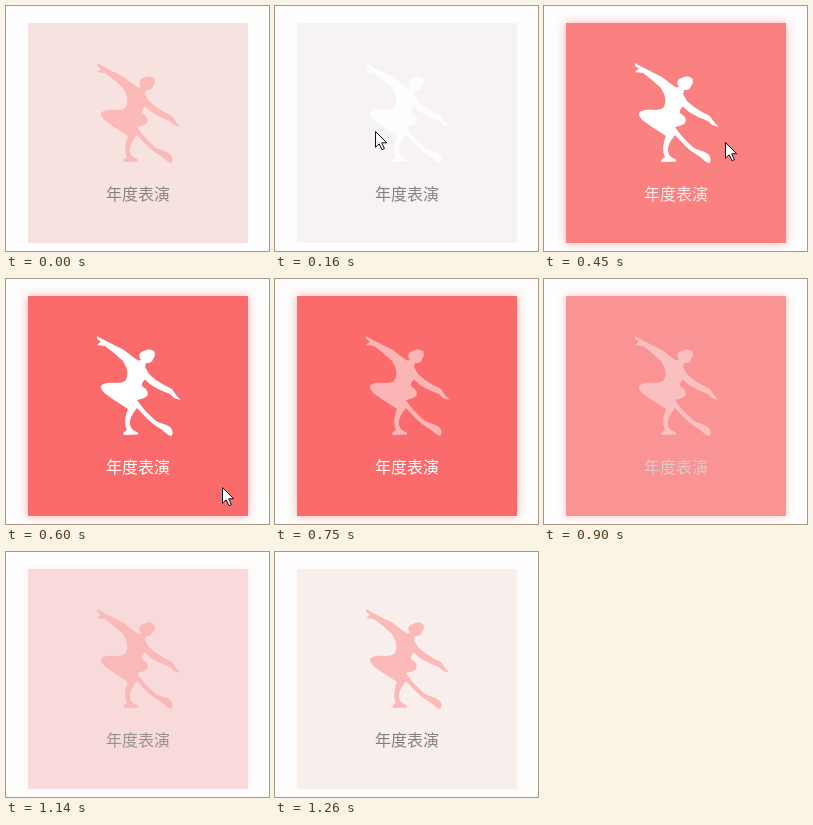
An HTML page for the animation above (1360 ms loop, 263 by 245 pixels).

```html
<!DOCTYPE html>
<html lang="zh-CN">
<head>
<meta charset="utf-8">
<style>
  html, body { margin: 0; width: 100%; height: 100%; overflow: hidden; background: #fefefe; }
  #card { position: absolute; left: 22px; top: 17px; width: 220px; height: 220px; }
  #label {
    position: absolute; left: 0; top: 158px; width: 220px;
    font: 300 16px/24px "Noto Sans CJK SC", "Noto Sans CJK", sans-serif; text-align: center;
  }
  svg { position: absolute; left: 0; top: 0; }
</style>
</head>
<body>
<div id="card"><div id="label">年度表演</div></div>
<svg width="263" height="245">
  <path id="dancer" d="M91 57L97 60.500 108 66 118 71 127 78 132 81.500 135 81
    C132 77 133 73 138 72C141 69.500 147 70 148.500 73C149.500 77 148 79 147 80
    C146 84 143 84 140 84L139 88 143 95 150 101 158 106 166 110 170 116 174.500 121
    168 119 164 115 154 111 145 106 139 100.500C136 103 135 106 137 108
    C141 110 143 114 141 117C138 120 134 120 131 121
    C136 129 143 136 150 142C156 145 161 145 165 149C167 152 167 156 165 157
    C161 156 159 153 155 150C147 146 139 138 131 129
    C127 134 123 140 124 146C125 150 128 152 132 153.500L132 155.500 118 156 117 154 121 151
    C118 145 119 137 122 130C115 125 107 121 101 116
    C94 111 93 106 98 105C106 102 113 106 119 102
    C122 98 122 93 120 88L117 82 108 74 99 67 91 66 95 62.500 91 60Z"/>
  <path id="cursor" d="M.5.5V16.300L4.200 12.800 7 18.700 9.400 17.600 6.700 11.800H11.800Z"
    fill="#fff" stroke="#112"/>
</svg>
<script>
const LOOP = 1360;
const $ = id => document.getElementById(id);
const card = $('card'), label = $('label'), dancer = $('dancer'), cursor = $('cursor');

// start, card, dancer, text, glow radius, glow opacity, cursor tip
const states = [
  [0, '#f8e2e0', '#fbb9b8', '#8a8484', 0, 0],
  [160, '#f6f3f2', '#fdfdfd', '#858080', 0, 0, [100, 125]],
  [300, '#f8b4b5', '#fff', '#b5a9aa', 5, .3, [177, 128]],
  [450, '#fb8181', '#fff', '#fbeaea', 9, .5, [181, 136]],
  [600, '#fc6b6b', '#fff', '#fff', 9, .5, [216, 208]],
  [750, '#fc6b6b', '#fcb5b5', '#fff', 9, .5],
  [900, '#fa9494', '#fac0c0', '#dccaca', 7, .4],
  [1020, '#f7c1c1', '#f8bcbc', '#aaa2a4', 5, .15],
  [1140, '#f8dada', '#fab9b9', '#989092', 8, .04],
  [1260, '#f8eeec', '#fbb9b8', '#858080', 8, .02]
];

function draw(now) {
  const t = now % LOOP;
  const [, fill, figure, text, blur, alpha, tip] = states.findLast(s => s[0] <= t);
  const glow = a => `rgba(252,107,107,${a})`;
  card.style.background = fill;
  card.style.boxShadow = blur ? `0 0 ${blur}px ${glow(alpha)}, 0 0 0 8px ${glow(.015)}` : 'none';
  label.style.color = text;
  dancer.setAttribute('fill', figure);
  cursor.style.display = tip ? '' : 'none';
  if (tip) cursor.setAttribute('transform', `translate(${tip})`);
}

let start;
function tick(now) {
  start ??= now;
  draw(now - start);
  requestAnimationFrame(tick);
}
draw(0);
requestAnimationFrame(tick);
</script>
</body>
</html>
```
